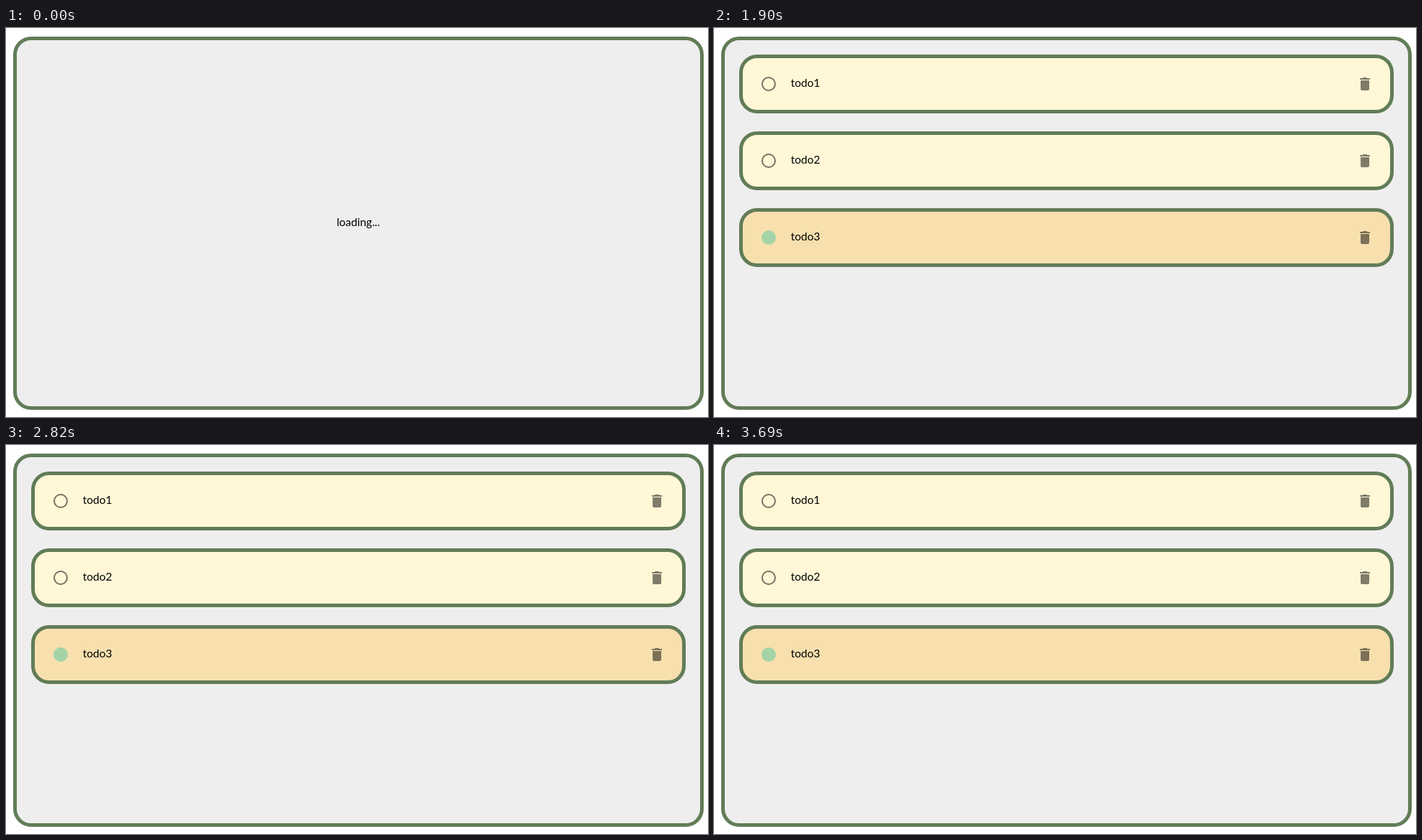
Recreate the animation shown at these times as an HTML page. Size 976x542 px, loop 4.09 s.

```html
<!DOCTYPE html>
<html lang="en">
<head>
<meta charset="utf-8">
<title>Todo list</title>
<style>
  html, body { margin: 0; width: 100%; height: 100%; overflow: hidden; background: #fff; }
  svg { display: block; width: 976px; height: 542px; }
  text { font: 15.5px Lato, "Noto Sans", sans-serif; fill: #000; }
  .frame { stroke: #617c57; stroke-width: 5; }
  .ring { fill: none; stroke: #000; stroke-opacity: .54; stroke-width: 2; }
  .done { fill: #a4d3a7; }
  .bin { fill: #000; fill-opacity: .5; }
</style>
</head>
<body>
<svg viewBox="0 0 976 542">
  <rect class="frame" x="12.5" y="14.5" width="955" height="515" rx="22.5" fill="#eee"/>
  <text id="loading" x="489.8" y="276" text-anchor="middle">loading...</text>
  <g id="list" visibility="hidden"></g>
</svg>
<script>
  const LOOP = 4090, LOADED = 1900, PITCH = 107;
  const BIN = "M6 19c0 1.1.9 2 2 2h8c1.1 0 2-.9 2-2V7H6zM19 4h-3.5l-1-1h-5l-1 1H5v2h14z";
  const todos = [
    { title: "todo1", done: false },
    { title: "todo2", done: false },
    { title: "todo3", done: true },
  ];

  const loading = document.getElementById("loading");
  const list = document.getElementById("list");

  const card = ({ title, done }, i) => `
    <g transform="translate(0 ${i * PITCH})">
      <rect class="frame" x="37.5" y="39.5" width="905" height="77" rx="22.5"
        fill="${done ? "#f7e0ae" : "#fff7d6"}"/>
      <circle class="${done ? "done" : "ring"}" cx="76" cy="78" r="${done ? 10 : 9}"/>
      <text x="106.7" y="82">${title}</text>
      <path class="bin" transform="translate(893 66)" d="${BIN}"/>
    </g>`;
  list.innerHTML = todos.map(card).join("");

  const start = performance.now();
  function draw(now) {
    const loaded = Math.max(0, now - start) % LOOP >= LOADED;
    loading.setAttribute("visibility", loaded ? "hidden" : "visible");
    list.setAttribute("visibility", loaded ? "visible" : "hidden");
    requestAnimationFrame(draw);
  }
  draw(start);
</script>
</body>
</html>
```
